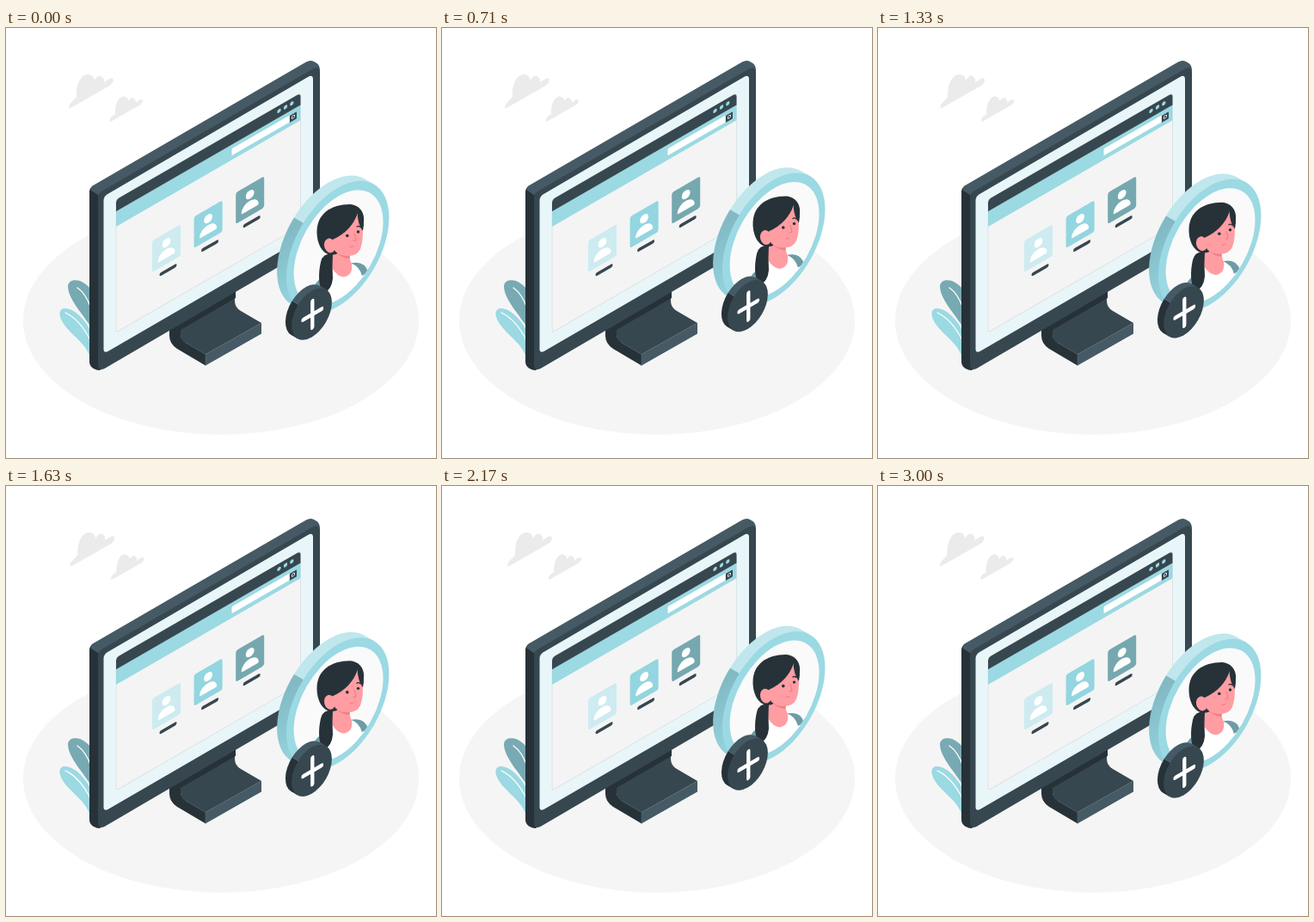
These frames come from a looping animation (500 px wide and 500 px high, 3040 ms). An HTML page:

```html
<!DOCTYPE html>
<html lang="en">
<head>
<meta charset="utf-8">
<title>Add a contact</title>
<style>
  html, body { margin: 0; width: 100%; height: 100%; overflow: hidden; background: #fff; }
  svg { display: block; width: 100%; height: 100%; }
</style>
</head>
<body>
<svg viewBox="0 0 500 500">
  <defs>
    <linearGradient id="rim" x1="0" y1="0" x2="0" y2="1">
      <stop offset=".1" stop-color="#82bac4"/>
      <stop offset=".8" stop-color="#92d1dc"/>
    </linearGradient>
    <clipPath id="portrait"><circle r="60" transform="matrix(.866 -.5 0 1 386.6 255.500)"/></clipPath>
  </defs>

  <ellipse cx="250" cy="340" rx="230" ry="132.8" fill="#f5f5f5"/>

  <g id="clouds" fill="#ebebeb">
    <path d="M73 92C74 87 79 84 82 80C81 66 87 54 95 54C100 54 102 57 103 61C105 56 109 54 112 57C114 59 114 61 114 63.500C117 61 122 57.500 124 58.500C126 62 123 66 119 68L76 92.500Q73 94 73 92Z"/>
    <path d="M120.500 107.500C121 104 124 102 127 100C126 90 131 79 137 79.500C140 80 142 82 142.500 85C144 81 148 80 150 83C151 85 151 86 151 87C153 85 157 82 158.500 83.500C160 86 157 89 154 90.500L123 108.300Q120.500 109.500 120.500 107.500Z"/>
  </g>

  <g id="leaves">
    <path d="M99 348C88 331 73 316 72 301C72 294 78 292 86 294Q93 297 99 304Z" fill="#78aab3"/>
    <path d="M99 386C94 368 81 361 70 348C61 337 60 328 67 326C78 325 91 337 99 353Z" fill="#9bd9e3"/>
    <path d="M83 302Q93 309 99 326M69 331Q86 339 98 363" fill="none" stroke="#fff" stroke-width="1.300" stroke-linecap="round"/>
  </g>

  <g id="stand">
    <path d="M190 348L203 343V358Q204 362 208 365L232 379V392.500L199 373Q190 367 190 358Z" fill="#263238"/>
    <path d="M203 342L266 306V317Q266 325 273 329L297 343L232 379.500L208 365.500Q203 363 203 357Z" fill="#37474f"/>
    <path d="M203 342L267 306V314L203 351Z" fill="#263238"/>
    <path d="M232 379.500L297 343V355.500L232 392.500Z" fill="#455a64"/>
    <path d="M208 365.500L232 379.500L297 343M232 379.500V392.500" fill="none" stroke="#55686f" stroke-width=".6"/>
  </g>

  <g id="monitor">
    <path d="M97 191Q97 186 101 183.500L120 180V390L109 398Q105 398 101 395.500Q97 393 97 388Z" fill="#263238"/>
    <path d="M99 186Q99.500 184.300 101 183.300L349 39.500Q354 36.700 358 39L361.500 41Q365 43.500 365 50L111 196L107.500 194.500L98.500 188.500Z" fill="#455a64"/>
    <path d="M107 197Q107 192.500 111 190L356 48Q364.500 43.500 365 51V245Q365 250 360 252.500L115 395.700Q107 400 107 391Z" fill="#37474f"/>
    <path d="M113.500 201Q113.500 196 117.500 193.500L351 57Q357 53.500 357 59.500V233Q357 237.500 353 240L118.500 376Q113.500 378.500 113.500 373Z" fill="#e9f6f9"/>
    <g id="page" transform="matrix(1 -.577 0 1 128 200.500)">
      <rect y="-1" width="214.500" height="154.500" rx="3" fill="#f4f4f4" stroke="#d9dedf" stroke-width=".8"/>
      <path d="M0 30.500V12.500H214.500V30.500Z" fill="#9bd9e3"/>
      <path d="M0 12.700V3Q0-1 4-1H210.500Q214.500-1 214.500 3V12.700Z" fill="#37474f"/>
      <rect x="134.500" y="17.500" width="67" height="8" rx="1" fill="#fff"/>
      <rect x="202" y="18" width="8" height="8" rx=".8" fill="#37474f"/>
      <circle cx="206" cy="21.600" r="1.600" fill="none" stroke="#fff" stroke-width=".8"/>
      <g fill="#9bd9e3">
        <circle cx="189.500" cy="5.200" r="2.200"/>
        <circle cx="197" cy="5.200" r="2.200"/>
        <circle cx="204.300" cy="5.200" r="2.200"/>
      </g>
    </g>
  </g>

  <g id="badge">
    <g id="disc"></g>
    <g clip-path="url(#portrait)">
      <path d="M354 312Q360 292 372 285L400 272Q415 272 421 285L424 325H354Z" fill="#fff"/>
      <path d="M355 306Q360 294 371 287L379 291L369 312Z" fill="#6d9ca4"/>
      <path d="M401 273.500Q417 270 421 284L414 288Q411 277 401 273.500Z" fill="#6d9ca4"/>
      <path d="M378 256L400 262Q399 269 402 274Q404 287 393 289.500Q385 289 379 279Z" fill="#ff9da3"/>
      <path d="M361.500 238C361 216 378 205 400 205C412 206 418 216 415.500 227L410 240L384 263C372 267 362 256 361.500 238Z" fill="#263238"/>
      <path d="M380 246Q402 236 409 215Q414 222 414.500 230Q416 246 412 257Q408 265 398 265Q389 265 383 260L379 252Z" fill="#ff9da3"/>
      <path d="M384 261Q391 266 400 264.700Q399 267 399 268Q390 267 384 261Z" fill="#ee7f85"/>
      <path d="M408.500 214Q409 229 415 236Q418 222 412 212Z" fill="#263238"/>
      <ellipse cx="376.500" cy="253" rx="6.500" ry="8.500" transform="rotate(-12 376.500 253)" fill="#ff9da3"/>
      <path d="M380 262Q368 262 366 272C363 285 363 300 369 309Q379 304 380 291Q379 277 380 262Z" fill="#263238"/>
      <g fill="#263238"><circle cx="396.800" cy="241.500" r="1.800"/><circle cx="409.500" cy="237" r="1.700"/></g>
      <path d="M408 231Q410 229.500 412 231.500" fill="none" stroke="#263238" stroke-width="1.300" stroke-linecap="round"/>
      <path d="M405 239Q407 244 407 247L404 247.500M400 254.500Q402.500 255.500 404 253.500" fill="none" stroke="#e8737c" stroke-width=".9" stroke-linecap="round"/>
    </g>
    <g id="button"></g>
  </g>
</svg>

<script>
  const LOOP = 3040, FPS = 24;
  const el = id => document.getElementById(id);
  const add = (id, markup) => el(id).insertAdjacentHTML('beforeend', markup);

  // Profile cards, laid out flat and skewed by the page
  ['#cdebf0', '#93d5e0', '#76a8b0'].forEach((color, i) => add('page', `
    <g transform="translate(${42 + i * 48.6} 71.200)">
      <rect width="33" height="36.500" rx="2.500" fill="${color}"/>
      <circle cx="16.500" cy="11.800" r="4.900" fill="#fff"/>
      <path d="M6.500 28A10 9 0 0 1 26.500 28Q26.500 29.300 25 29.300H8Q6.500 29.300 6.500 28Z" fill="#fff"/>
      <path d="M10.500 44.500H26.500" stroke="#37474f" stroke-width="4" stroke-linecap="round"/>
    </g>`));

  // Isometric coin: d is the thickness, the rim is split into a lit and a shaded part
  function coin(id, x, y, r, d, face, lit, shade, inner) {
    const s = r * Math.SQRT1_2, u = -r * .667, v = -r * .745;
    const rim = (x1, y1, x2, y2, fill) => `<path fill="${fill}" d="M${x1} ${y1}l${-d} ${-d}
      A${r} ${r} 0 0 0 ${x2 - d} ${y2 - d}l${d} ${d}L${x1} ${y1}Z"/>`;
    add(id, `<g transform="matrix(.866 -.5 0 1 ${x} ${y})">
      ${rim(u, v, -s, s, shade)}${rim(s, -s, u, v, lit)}
      <circle r="${r}" fill="${face}"/>${inner}</g>`);
  }
  coin('disc', 385.7, 255, 69, 12.5, '#9bd9e3', '#bfe7ed', 'url(#rim)',
    '<circle cx="1" cy="1" r="60" fill="#fafafa"/>');
  coin('button', 355.5, 332.5, 27, 8.3, '#37474f', '#455a64', '#263238',
    '<path d="M-11.500 .9H13.300M.9-14.500V16.300" stroke="#fff" stroke-width="5" stroke-linecap="round"/>');

  const SHAKE = [0, -1, 2, -4, 4, -4, 4, -4, 2, -1, 0];

  function cloudShift(ms) {
    const p = Math.max(0, ms - 1000) / 300, i = Math.floor(p);
    return SHAKE[i] + (SHAKE[i + 1] - SHAKE[i]) * (p - i);
  }

  function floatShift(ms) {
    const p = ms % 1500 / 750;
    return -10 * (1 - Math.abs(1 - p));
  }

  function draw(time) {
    const step = Math.floor((time % LOOP + 5) * FPS / 1000);
    const ms = Math.min(step, 72) * 1000 / FPS;
    el('badge').setAttribute('transform', `translate(0 ${floatShift(ms)})`);
    el('clouds').setAttribute('transform', `translate(${cloudShift(ms)} 0)`);
  }

  const start = performance.now();
  function tick() {
    draw(performance.now() - start);
    requestAnimationFrame(tick);
  }
  tick();
</script>
</body>
</html>
```
